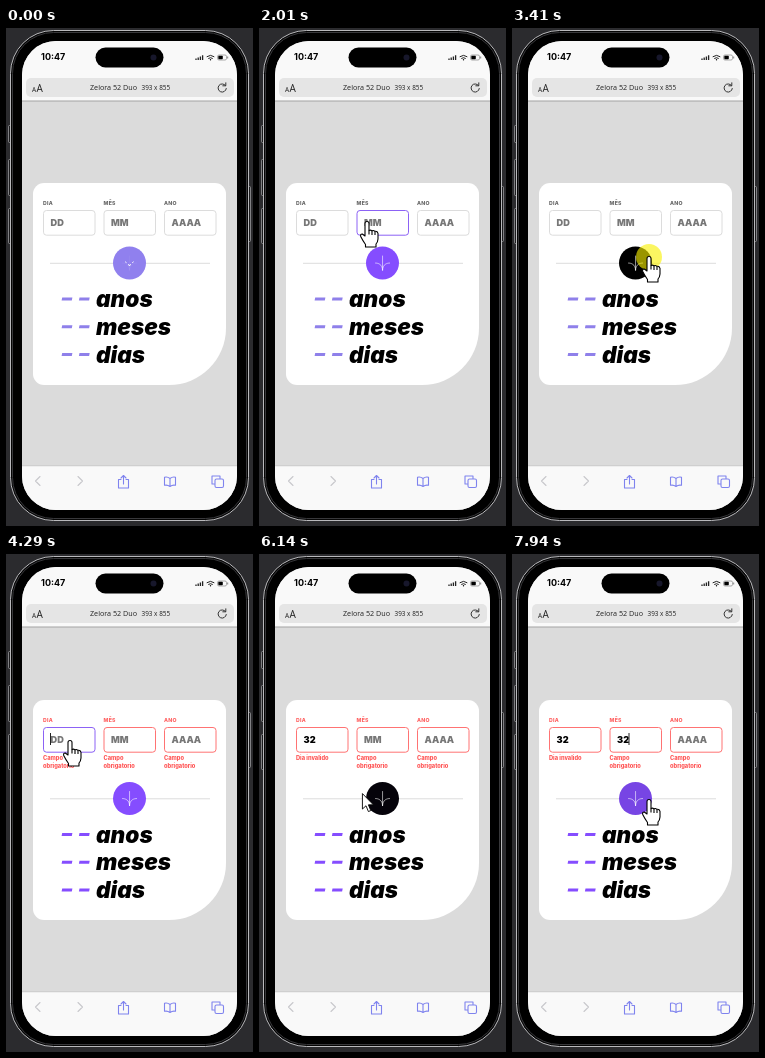
Recreate the animation shown at these times as an HTML page. Size 247 by 498 pixels, loop 8 s.

```html
<!DOCTYPE html>
<html lang="pt">
<head>
<meta charset="utf-8">
<title>Calculadora de idade</title>
<style>
  html, body { margin: 0; width: 100%; height: 100%; overflow: hidden; background: #2b2b2e; }
  svg { display: block; width: 100%; height: 100%; font-family: Inter, "Open Sans", sans-serif; }
  .label { font-size: 5.2px; font-weight: 800; letter-spacing: .25px; }
  .value { font-size: 9.2px; font-weight: 900; }
  .error { font-size: 5.7px; font-weight: 800; fill: #ff5757; }
  .result { font-size: 22.6px; font-weight: 900; font-style: italic; }
  .bar { font-family: "Open Sans", sans-serif; fill: #222; }
  .line { fill: none; stroke-linecap: round; stroke-linejoin: round; }
</style>
</head>
<body>
<svg viewBox="0 0 247 498">
  <!-- phone -->
  <g fill="#1b1b1d" stroke="#a9a9ac" stroke-width=".7">
    <rect x="2.5" y="97.5" width="4" height="17" rx="1"/>
    <rect x="2.5" y="131.5" width="4" height="36" rx="1"/>
    <rect x="2.5" y="180.5" width="4" height="35" rx="1"/>
    <rect x="240.5" y="158.5" width="4" height="55" rx="1"/>
  </g>
  <rect x="4.5" y="2.5" width="238" height="490" rx="43" fill="#050505" stroke="#b9b9bc"/>
  <rect x="6.5" y="4.5" width="234" height="486" rx="41" fill="#000" stroke="#38383b"/>
  <clipPath id="screen"><rect x="16" y="13" width="215" height="469" rx="34"/></clipPath>
  <g clip-path="url(#screen)">
    <rect x="16" y="13" width="215" height="470" fill="#dbdbdb"/>
    <rect x="16" y="13" width="215" height="60" fill="#f9f9f9"/>
    <rect x="16" y="72.5" width="215" height="1" fill="#a3a3a3"/>
    <rect x="16" y="438" width="215" height="46" fill="#f9f9f9"/>
    <rect x="16" y="437.5" width="215" height=".7" fill="#c4c4c4"/>
  </g>
  <rect x="89.5" y="19.5" width="68" height="20" rx="10"/>
  <circle cx="147.5" cy="29.5" r="3" fill="#17172b"/>
  <text x="35" y="32" font-size="9" font-weight="700">10:47</text>
  <path d="M190 32v-1.5M192.200 32v-2.5M194.400 32v-3.500M196.600 32v-4.700" stroke="#222" stroke-width="1.300"/>
  <path class="line" d="M201 28.600q3.500-2.700 7 0M202.600 30.300q1.900-1.400 3.800 0" stroke="#222"/>
  <circle cx="204.500" cy="31.700" r=".7"/>
  <rect x="211.500" y="27" width="9" height="5" rx="1.500" fill="none" stroke="#888" stroke-width=".7"/>
  <rect x="212.300" y="27.800" width="4.500" height="3.400" rx=".7"/>
  <path d="M221.700 28.500v2" stroke="#888"/>
  <rect x="20" y="50" width="208" height="19" rx="5" fill="#e5e5e5"/>
  <text class="bar" x="26" y="64" font-size="6.500">A</text>
  <text class="bar" x="30.500" y="64" font-size="10">A</text>
  <text class="bar" x="84" y="62" font-size="7.200">Zelora 52 Duo</text>
  <text class="bar" x="135.500" y="62" font-size="6.400">393 x 855</text>
  <path class="line" d="M219.500 57.500a4.100 4.100 0 1 0 .8 3M219.800 54.800v3h-3" stroke="#333"/>
  <g class="line" stroke-width="1.100">
    <path d="M34 448.500l-4.500 4.500 4.500 4.500M72 448.500l4.500 4.500-4.500 4.500" stroke="#c8c8cc"/>
    <g stroke="#7f83ee">
      <path d="M115 451.500h-2.500v8.500h10v-8.500h-2.500M117.500 456v-8.500M115 450l2.500-2.500 2.500 2.500"/>
      <path d="M164 450.500q-2.500-2-5.500-1.200v8q3-.7 5.500 1.200 2.500-1.900 5.500-1.200v-8q-3-.8-5.500 1.200v8"/>
      <path d="M208.500 456h-2.500v-8h8v2.500"/>
      <rect x="209" y="451" width="8.500" height="8.500" rx="1.500"/>
    </g>
  </g>

  <!-- card -->
  <path id="card" fill="#fff"/>
  <g id="fields"></g>
  <g id="lower">
    <path d="M44 235.300H204" stroke="#dcdcdc"/>
    <circle id="button" cx="123.500" cy="235" r="16.500"/>
    <g id="icon" class="line" stroke="#fff" transform="translate(116.200 228) scale(.32)">
      <path d="M1 22C8.300 21.700 23 25.600 23 44M23 44V0M45 22C37.700 21.700 23 25.600 23 44" stroke-width="2.300"/>
    </g>
    <path id="spots" class="line" d="M119.500 234l.7.500M127.300 234l-.7.500M122.600 236.500l.9 1.500.9-1.500" stroke="#fff"/>
    <g id="results"></g>
  </g>

  <rect id="caret" width="1" height="12" fill="#222"/>
  <circle id="click" r="13" fill="#f8f000" fill-opacity=".62"/>
  <g id="cursor" stroke="#000" stroke-linejoin="round">
    <path id="arrow" d="M0 0V15.500L3.600 12.200 6 18 8.400 17 6 11.300H11Z" fill="#fff" stroke-width=".9"/>
    <path id="beam" d="M-3-8H3M0-8V8M-3 8H3"/>
    <g id="hand" fill="#fff" stroke-width="1.100">
      <path d="M-2 1.500a2 2 0 0 1 4 0V8.500q1.500-1 3 .3 1.600-.9 2.800.5 2.600-.4 3.200 2V17q-.2 3-2 5v3H-1.500v-2.500Q-4 19-6.300 14.500q-.6-2.600 1.600-2.500L-2 14Z"/>
      <path d="M2 8.500v4M5 9v4M8 9.500v3.500" fill="none"/>
    </g>
  </g>
</svg>
<script>
const LOOP = 8000, STEP = 70, ENTER = 260, FAIL = 3470, FADE = 250;
const PURPLE = [133, 77, 255], PALE = [144, 128, 238], RED = '#ff5f5f';
const $ = id => document.getElementById(id);

function add(parent, tag, attrs, text) {
  const el = document.createElementNS('http://www.w3.org/2000/svg', tag);
  for (const k in attrs) el.setAttribute(k, attrs[k]);
  if (text) el.textContent = text;
  parent.appendChild(el);
  return el;
}
const set = (el, k, v) => el.setAttribute(k, v);
const show = (el, on) => set(el, 'visibility', on ? 'visible' : 'hidden');
const clamp = v => Math.max(0, Math.min(1, v));
const ease = p => p * p * (3 - 2 * p);

const fields = [['DIA', 'DD'], ['MÊS', 'MM'], ['ANO', 'AAAA']].map(([label, hint], i) => {
  const g = $('fields'), x = 37 + 60.5 * i;
  return {
    x, hint,
    label: add(g, 'text', { class: 'label', x, y: 177 }, label),
    box: add(g, 'rect', { x: x + .5, y: 182.5, width: 51.5, height: 24.7, rx: 3, fill: '#fff' }),
    text: add(g, 'text', { class: 'value', x: x + 7.5, y: 198.3 }),
    err1: add(g, 'text', { class: 'error', x, y: 215 }),
    err2: add(g, 'text', { class: 'error', x, y: 223 }, 'obrigatorio')
  };
});

const dashes = ['anos', 'meses', 'dias'].map((word, i) => {
  const y = 279 + i * 27.8, g = $('results');
  add(g, 'text', { class: 'result', x: 90, y }, word);
  const dash = x => `M${x} ${y - 9.5}h10.2l-.6 3h-10.2z`;
  return add(g, 'path', { d: dash(56.2) + dash(73.5) });
});

// cursor stops: arrival, x, y, departure if it rests
const stops = [
  [260, 213, 484], [890, 96, 270], [1170, 126, 238], [1870, 72, 203], [2010, 108, 194],
  [2710, 180, 202], [3130, 137, 229, 3410], [3470, 137, 231, 3670], [4220, 64, 187, 4690],
  [5200, 123.5, 252, 5930], [6560, 46, 204], [6980, 98, 204, 7110], [7180, 111, 188, 7520],
  [7800, 146, 226], [7940, 137, 246]
];
// click time and the field it lands on (-1: button)
const clicks = [[3410, -1], [4220, 0], [5660, -1], [7180, 1]];
const restarts = [0, ENTER, FAIL, 4290, 5660, 5930, 7590];

// the picture advances in even steps after each pause
function snap(t) {
  const from = restarts.filter(v => v <= t).pop();
  return from + Math.floor((t - from) / STEP) * STEP;
}

function position(t) {
  const i = Math.max(0, stops.findLastIndex(s => s[0] <= t));
  const [t0, x, y, leave = t0] = stops[i];
  const [t1, x1, y1] = stops[i + 1] || [LOOP, x, y];
  const k = ease(clamp((t - leave) / (t1 - leave)));
  return [x + (x1 - x) * k, y + (y1 - y) * k];
}

// share of the last moments spent over the button
function hoverFade(t, onButton) {
  const n = 25;
  let hits = 0;
  for (let i = 0; i < n; i++) hits += onButton(...position(t - i * FADE / n));
  return ease(hits / n);
}

function draw(time) {
  const t = snap(time), visible = t >= ENTER, failed = t >= FAIL;
  const up = failed ? 9 : 0, down = failed ? 9.5 : 0;
  const [x, y] = position(t);
  const inside = (l, top, r, b) => x >= l && x <= r && y >= top && y <= b;
  const onButton = (px, py) => Math.hypot(px - 123.5, py - 235 - down) < 16.5;

  const top = 155 - up, low = 357 + up;
  set($('card'), 'd', `M38 ${top}H209a11 11 0 0 1 11 11V${low - 57}a57 57 0 0 1-57 57H38a11 11 0 0 1-11-11V${top + 11}a11 11 0 0 1 11-11Z`);
  set($('fields'), 'transform', `translate(0 ${-up})`);
  set($('lower'), 'transform', `translate(0 ${down})`);

  const lastClick = clicks.filter(c => c[0] <= t).pop();
  let hand = onButton(x, y);
  let beam = inside(90, 262 + down, 165, 338 + down);
  show($('caret'), false);
  fields.forEach((f, i) => {
    const over = visible && inside(f.x, 182 - up, f.x + 52, 208 - up);
    const [opened] = clicks.find(c => c[1] === i) || [LOOP];
    const count = Math.max(0, Math.min(2, Math.floor((t - opened - 260) / 140)));
    const typed = '32'.slice(0, count);
    const invalid = !i && t >= 5730;
    hand = hand || over;
    beam = beam || failed && inside(f.x, 200, f.x + 33, invalid ? 208 : 216);
    set(f.label, 'fill', failed ? RED : '#666');
    set(f.box, 'stroke', over ? '#8c62f5' : failed ? '#ff7373' : '#dcdcdc');
    f.text.textContent = typed || f.hint;
    set(f.text, 'fill', typed ? '#000' : '#777');
    f.err1.textContent = invalid ? 'Dia invalido' : 'Campo';
    show(f.err1, failed);
    show(f.err2, failed && !invalid);
    if (lastClick && lastClick[1] === i) {
      const since = opened + (count ? 260 + 140 * count : 0);
      set($('caret'), 'x', f.x + 7 + count * 6);
      set($('caret'), 'y', 179);
      show($('caret'), (t - since) % 1000 < 500);
    }
  });

  const fresh = t < 1100, light = 1 - hoverFade(t, onButton);
  set($('button'), 'fill', `rgb(${(fresh ? PALE : PURPLE).map(c => Math.round(c * light))})`);
  set($('icon'), 'opacity', fresh ? .08 : .8);
  show($('spots'), fresh);
  for (const p of dashes) set(p, 'fill', failed ? '#854dff' : '#8f80ea');

  set($('cursor'), 'transform', `translate(${x} ${y})`);
  show($('hand'), visible && hand);
  show($('beam'), visible && beam && !hand);
  show($('arrow'), visible && !hand && !beam);
  set($('click'), 'cx', x);
  set($('click'), 'cy', y);
  show($('click'), clicks.some(([c]) => time >= c && time < c + 60));
}

const start = performance.now();
function tick() {
  draw((performance.now() - start) % LOOP);
  requestAnimationFrame(tick);
}
tick();
</script>
</body>
</html>
```
